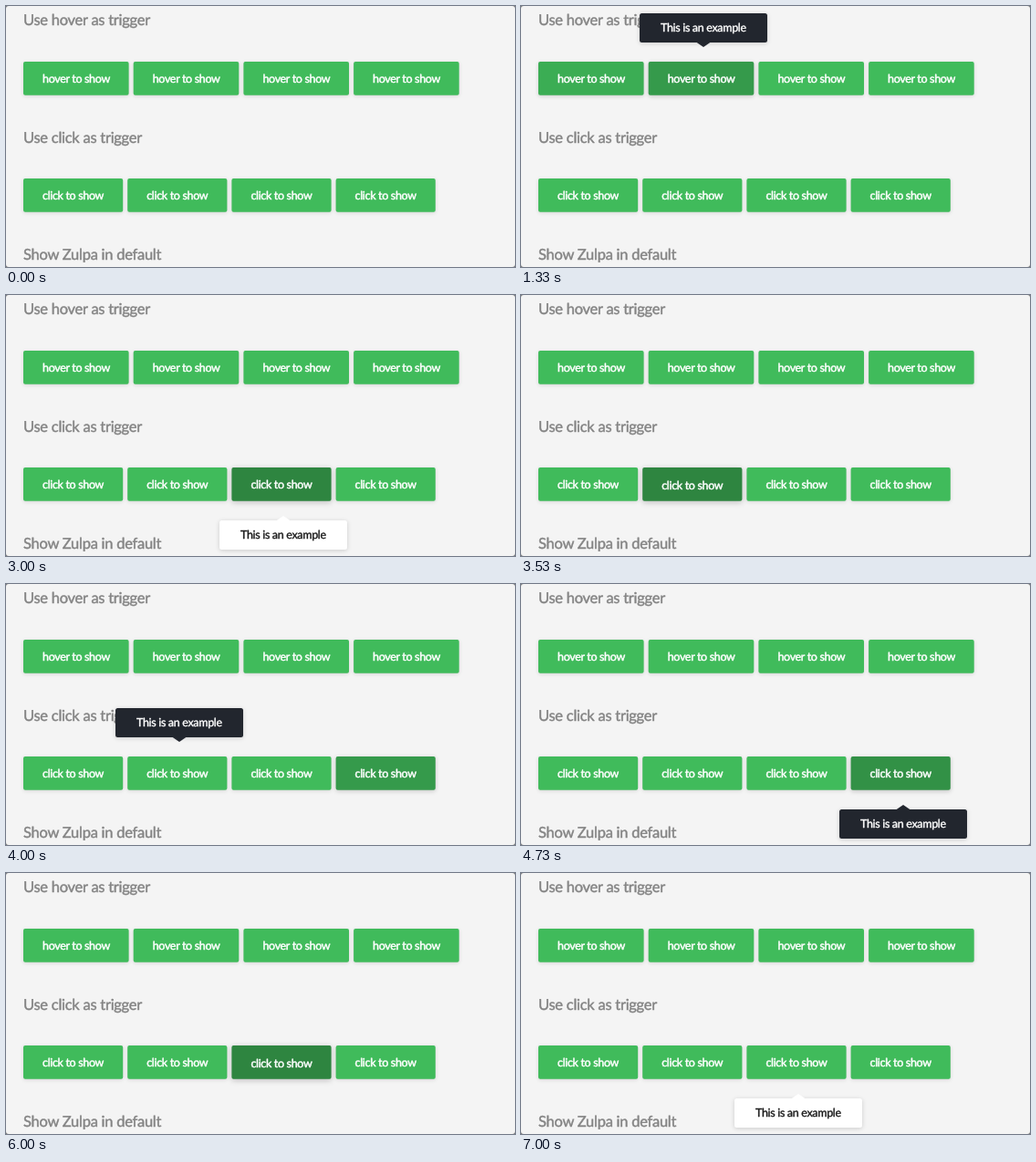
Write an HTML page with a canvas that moves like this. It is 558 px wide and 286 px high and loops after 7.34 s.

```html
<!DOCTYPE html>
<html lang="en">
<head>
<meta charset="utf-8">
<title>Tooltip triggers</title>
<style>
  html, body { margin: 0; width: 100%; height: 100%; overflow: hidden; background: #f4f4f4; }
  canvas { display: block; }
</style>
</head>
<body>
<canvas id="stage" width="558" height="286"></canvas>
<script>
const ctx = document.getElementById('stage').getContext('2d');
const W = 558, H = 286, LOOP = 7340, FADE = 270, LEFT = 19;
const GREEN = [64, 187, 91], DARK_GREEN = [46, 133, 64];

const headings = [
  ['Use hover as trigger', 21.4],
  ['Use click as trigger', 150.4],
  ['Show Zulpa in default', 278.4]
];

// hovers: [enter, leave], presses: [down, up], tips: [show, hide]
const button = (hovers, tips, presses = []) => ({ hovers, tips, presses });
const rows = [
  { y: 61, w: 115.6, pitch: 120.7, label: 'hover to show', buttons: [
    button([[830, 1200]], [[870, 1265]]),
    button([[1230, 1800]], [[1265, 1860]]),
    button([[1870, 2290]], [[1930, 2330]]),
    button([[4900, 5380]], [[4930, 5400]])
  ] },
  { y: 189, w: 109.2, pitch: 114.2, label: 'click to show', buttons: [
    button([], []),
    button([[3070, 3750]], [[3600, 4330]], [[3530, 3600]]),
    button([[2420, 3010], [5630, 6690]], [[2730, 3530], [6200, LOOP]], [[2640, 2730], [5930, 6200]]),
    button([[3900, 4700], [5500, 5650]], [[4400, 5930]], [[4330, 4400]])
  ] }
];

const within = (t, spans) => spans.some(([a, b]) => t >= a && t < b);

function ease(x) {
  const rest = 1 - Math.min(1, Math.max(0, x));
  return 1 - rest * rest;
}

function hoverLevel(t, hovers) {
  return Math.max(0, ...hovers.map(([enter, leave]) =>
    ease((t - enter) / FADE) * (1 - ease((t - leave) / FADE))));
}

function mix(a, b, k) {
  return `rgb(${a.map((v, i) => Math.round(v + (b[i] - v) * k)).join(',')})`;
}

function shadow(alpha, blur, dy) {
  ctx.shadowColor = `rgba(0,0,0,${alpha})`;
  ctx.shadowBlur = blur;
  ctx.shadowOffsetY = dy;
}

function roundRect(x, y, w, h, r) {
  ctx.moveTo(x + r, y);
  ctx.arcTo(x + w, y, x + w, y + h, r);
  ctx.arcTo(x + w, y + h, x, y + h, r);
  ctx.arcTo(x, y + h, x, y, r);
  ctx.arcTo(x, y, x + w, y, r);
  ctx.closePath();
}

function text(str, x, y, size, color, weight) {
  ctx.font = `${size}px Lato, sans-serif`;
  ctx.textRendering = 'geometricPrecision';
  ctx.letterSpacing = size > 15 ? '-0.26px' : '-0.33px';
  ctx.fillStyle = ctx.strokeStyle = color;
  ctx.lineWidth = weight;
  ctx.lineJoin = 'round';
  ctx.fillText(str, x, y);
  ctx.strokeText(str, x, y);
}

function drawButton(t, b, x, { y, w, label }) {
  const level = hoverLevel(t, b.hovers);
  ctx.save();
  shadow(0.13 + 0.1 * level, 4 + 2 * level, 1 + 0.5 * level);
  ctx.fillStyle = mix(GREEN, DARK_GREEN, level);
  ctx.beginPath();
  roundRect(x, y, w, 36.8, 2);
  ctx.fill();
  ctx.restore();
  text(label, x + 21, y + 23 + (within(t, b.presses) ? 1 : 0), 12.5, '#fff', 0.5);
}

function drawTip(center, rowY, index) {
  const above = index < 2, light = index % 2 === 0;
  const x = Math.round(center + 2.4) - 70;
  const y = above ? rowY - 53 : rowY + 58;
  const base = above ? y + 31.5 : y + 0.5;
  const tip = above ? y + 37 : y - 5;
  ctx.save();
  shadow(0.17, 5, 1);
  ctx.fillStyle = light ? '#fff' : '#22262e';
  ctx.beginPath();
  roundRect(x, y, 140, 32, 2.5);
  ctx.fill();
  ctx.shadowColor = 'transparent';
  ctx.beginPath();
  ctx.moveTo(x + 62, base);
  ctx.lineTo(x + 70, tip);
  ctx.lineTo(x + 78, base);
  ctx.fill();
  ctx.restore();
  text('This is an example', x + 23, y + 20, 12.5, light ? '#1c1c1c' : '#fff', 0.4);
}

function drawCorners() {
  ctx.fillStyle = '#777';
  ctx.beginPath();
  ctx.rect(0, 0, W, H);
  roundRect(0, 0, W, H, 3);
  ctx.fill('evenodd');
}

function draw(t) {
  ctx.fillStyle = '#f4f4f4';
  ctx.fillRect(0, 0, W, H);
  for (const [str, y] of headings) text(str, LEFT, y, 16.5, '#848484', 0.45);
  for (const row of rows)
    row.buttons.forEach((b, i) => drawButton(t, b, LEFT + i * row.pitch, row));
  for (const row of rows)
    row.buttons.forEach((b, i) => {
      if (within(t, b.tips)) drawTip(LEFT + i * row.pitch + row.w / 2, row.y, i);
    });
  drawCorners();
}

const start = performance.now();
function frame() {
  draw((performance.now() - start) % LOOP);
  requestAnimationFrame(frame);
}
frame();
</script>
</body>
</html>
```
